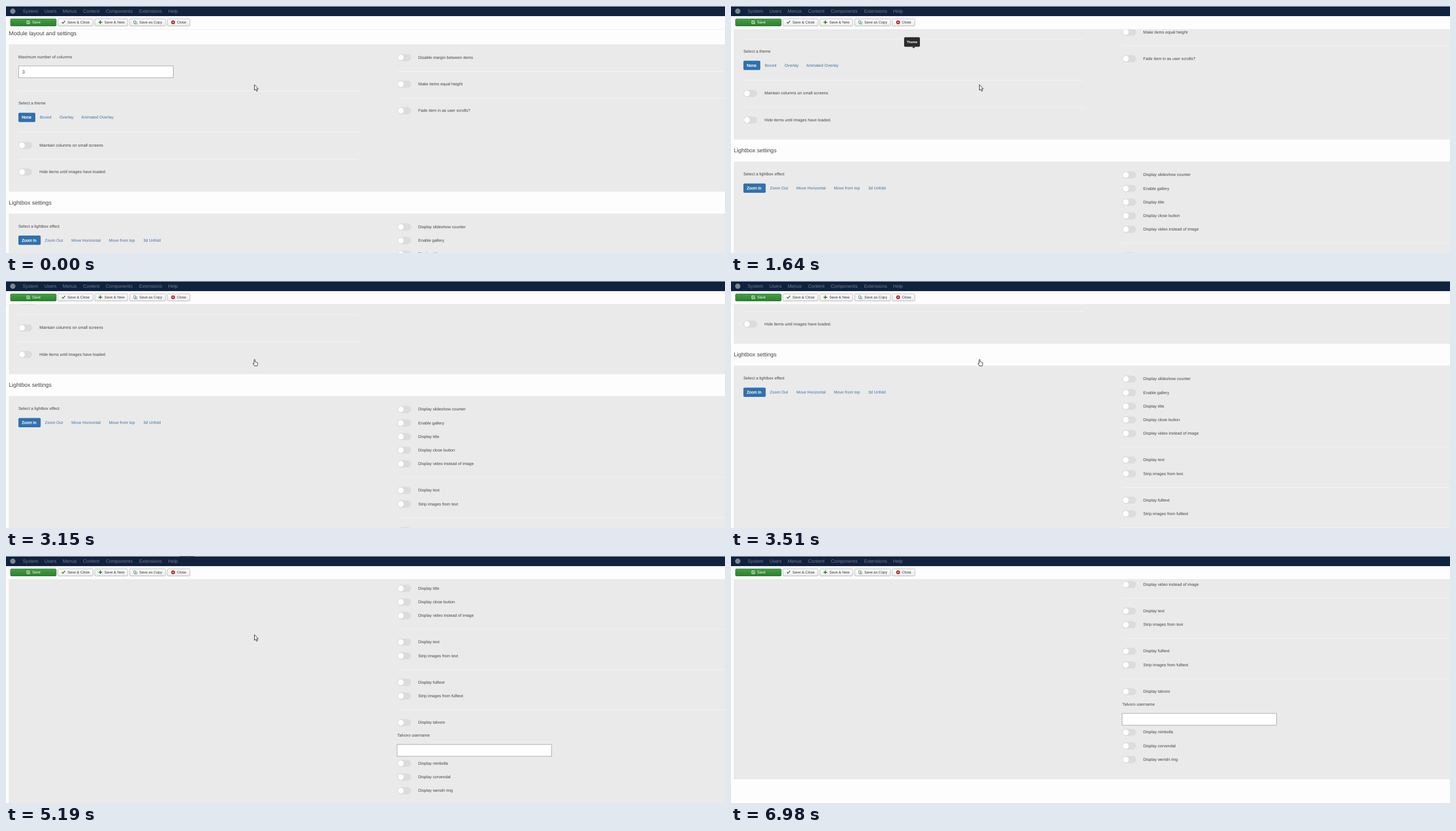
Animation of 1275 by 439 pixels, one loop 7.94 s. Source, as an HTML page:

```html
<!DOCTYPE html>
<html lang="en">
<head>
<meta charset="utf-8">
<title>Module settings</title>
<style>
html, body { margin: 0; width: 100%; height: 100%; overflow: hidden; background: #fdfdfd; }
svg { display: block; width: 1275px; height: 439px; }
text { font-family: "Liberation Sans", Arial, sans-serif; text-rendering: geometricPrecision; white-space: pre; }
</style>
</head>
<body>
<svg id="stage" viewBox="0 0 1275 439">
  <defs>
    <linearGradient id="green" x2="0" y2="1"><stop stop-color="#43a047"/><stop offset="1" stop-color="#2c812c"/></linearGradient>
    <linearGradient id="pale" x2="0" y2="1"><stop stop-color="#fff"/><stop offset="1" stop-color="#ebebeb"/></linearGradient>
  </defs>
  <g id="page"></g>
  <g id="bar"></g>
  <g id="tip"></g>
  <path id="arrow" d="M440.5 139.8v10l2.2-2 1.7 3.8 1.7-.8-1.7-3.6h3z" fill="#fff" stroke="#222" stroke-width=".9"/>
  <path id="hand" d="M439.8 147v-6.3q0-1.2 1-1.2t1 1.2v3.2q1.3-.5 1.6.4 1.2-.4 1.5.5 1.3-.2 1.3 1v2.5q0 1.5-.9 2.7h-4.6l-2.7-4q.4-1.2 1.8 0z" fill="#fff" stroke="#222" stroke-width=".9"/>
</svg>
<script>
const $ = id => document.getElementById(id);
const rect = (x, y, w, h, fill, more = '') =>
  `<rect x="${x}" y="${y}" width="${w}" height="${h}" fill="${fill}" ${more}/>`;
// Text is placed by its left edge and vertical middle.
const text = (x, y, s, size = 7.25, fill = '#434343', more = '') =>
  `<text x="${x}" y="${y + size * .345}" font-size="${size}" fill="${fill}" ${more}>${s}</text>`;
const toggle = (x, y, label) => rect(x, y - 6.3, 24.5, 12.8, '#dcdcdc', 'rx="6.4"') +
  `<circle cx="${x + 6.3}" cy="${y + .1}" r="5" fill="#fff"/>` + text(x + 37.3, y - .3, label);
const line = (x, y, w) => rect(x, y - .5, w, 1, '#f4f4f4');
const field = (x, y) => rect(x + .5, y + .5, 274, 21, '#fff', 'stroke="#aaa"');
const tabs = (y, width, items) => rect(22, y - 8.2, width, 16.4, '#3071ad', 'rx="2"') +
  items.map(([x, s], i) => i ? text(x, y, s, 7.2, '#41719f')
    : text(x, y, s, 7.1, '#fff', 'stroke="#fff" stroke-width=".25"')).join('');

const L = 22, R = 693.8;
const options = [
  [392.7, 'Display slideshow counter'], [416.8, 'Enable gallery'], [441, 'Display title'],
  [465.2, 'Display close button'], [489.4, 'Display video instead of image'],
  [536.6, 'Display text'], [560.8, 'Strip images from text'],
  [608, 'Display fulltext'], [632.2, 'Strip images from fulltext'],
  [679.6, 'Display talvoro'], [752, 'Display nimbolla'],
  [776.3, 'Display corvendal'], [800.5, 'Display wendri ring']
];

$('page').innerHTML =
  text(5, 48.3, 'Module layout and settings', 10.1) +
  rect(5, 68, 1270, 262, '#eaeaea') +
  text(L, 90, 'Maximum number of columns') + field(L, 106) + text(28.5, 117.5, '3', 8.5) +
  line(L, 151.5, 603) + text(L, 172.5, 'Select a theme') +
  tabs(198, 30, [[28, 'None'], [60, 'Boxed'], [95, 'Overlay'], [133.5, 'Animated Overlay']]) +
  line(L, 224.3, 603) + toggle(L, 247.7, 'Maintain columns on small screens') +
  line(L, 272.3, 603) + toggle(L, 295, 'Hide items until images have loaded.') +
  toggle(R, 91.5, 'Disable margin between items') + line(R, 116.3, 582) +
  toggle(R, 138.8, 'Make items equal height') + line(R, 163.5, 582) +
  toggle(R, 186, 'Fade item in as user scrolls?') +
  text(5, 349.5, 'Lightbox settings', 10.1) +
  rect(5, 369, 1270, 466.5, '#eaeaea') +
  text(L, 391, 'Select a lightbox effect') +
  tabs(416.3, 39.5, [[28, 'Zoom In'], [69, 'Zoom Out'], [116, 'Move Horizontal'], [182.5, 'Move from top'], [243.5, '3d Unfold']]) +
  options.map(([y, s]) => toggle(R, y, s)).join('') +
  [513.5, 585.3, 657].map(y => line(R, y, 582)).join('') +
  text(R, 702.3, 'Talvoro username') + field(R - .8, 718);

const button = (x, w, fill, stroke) => rect(x + .5, 23, w - 1, 12.5, fill, `rx="1.5" stroke="${stroke}" stroke-width=".9"`);
const pen = (d, colour, width = 1) => `<path d="${d}" fill="none" stroke="${colour}" stroke-width="${width}"/>`;
const menu = [[29.5, 'System'], [68, 'Users'], [100.5, 'Menus'], [136.5, 'Content'],
  [177, 'Components'], [236, 'Extensions'], [287.5, 'Help']];

$('bar').innerHTML =
  rect(0, 0, 1275, 41.5, '#fdfdfd') + rect(0, 41, 1275, .6, '#e6e6e6') +
  rect(0, 0, 1275, 18, '#10223e') + rect(0, 0, 1275, 1, '#c9ccd1') +
  '<circle cx="12" cy="9.3" r="4.7" fill="#7e8690"/>' +
  menu.map(([x, s]) => text(x, 9.5, s, 8.35, '#737d89')).join('') +
  button(7.5, 82, 'url(#green)', '#2b762b') + text(46.5, 29.2, 'Save', 6.5, '#fff') +
  [[91.5, 63.5, 109, 'Save &amp; Close'], [157, 59.5, 174.5, 'Save &amp; New'],
   [219, 64.5, 236.5, 'Save as Copy'], [285.5, 41, 303, 'Close']]
    .map(([x, w, tx, s]) => button(x, w, 'url(#pale)', '#b5b5b5') + text(tx, 29.2, s, 6.5, '#333')).join('') +
  pen('M41 26.5h-4v5h5v-2.5M38.5 28.5l1.3 1.5 2.5-3.5', '#fff', .9) +
  pen('M99 28.7l2 2 3.8-4.4', '#378137', 1.6) +
  pen('M164 28.8h6.6M167.3 25.5v6.6', '#378137', 1.7) +
  pen('M226.5 26h3v4.5h-3zM229.5 28h2.5v4h-3.5v-1.5', '#4d8a62', .8) +
  '<circle cx="296.3" cy="28.9" r="3.4" fill="#b3262a"/>' + pen('M295 27.6l2.6 2.6m0-2.6l-2.6 2.6', '#fff', .9);

const tips = {
  theme: [167.5, 28, 'Theme', 5.9],
  columns: [241.5, 220, 'When enabled the columns in this module will not collapse to a single column.', 5.65],
  effect: [386.5, 28, 'Theme', 5.9]
};

// Start time, scroll offset, pointer, tooltip
const steps = [
  [0, 0, 'arrow'], [140, 33, 'arrow'], [480, 54.7, 'arrow', 'theme'],
  [1640, 92.5, 'arrow', 'theme'], [2000, 110, 'hand', 'columns'], [2410, 141.5, 'hand', 'columns'],
  [2750, 162, 'hand'], [3150, 164.5, 'hand'], [3510, 218.5, 'hand'], [4230, 229, 'hand'],
  [4550, 273.5, 'arrow', 'effect'], [4860, 312, 'arrow', 'effect'], [5190, 383.5, 'arrow', 'effect'],
  [5490, 384.5, 'arrow'], [5940, 395.3, 'arrow'], [6270, 438.7, 'arrow'], [6420, 438.7, '']
];

function drawTip(name, scroll) {
  if (!name) return '';
  const [base, w, label, size] = tips[name], y = base - scroll;
  const fill = name === 'effect' ? '#414141' : '#2b2b2b';
  return rect(321 - w / 2, y - 19.5, w, 17, fill, 'rx="2"') +
    `<path d="M321 ${y - 2.6}h6l-3 2.9z" fill="${fill}"/>` +
    text(321, y - 11, label, size, '#fff', 'font-weight="700" text-anchor="middle"');
}

let shown;
function draw(now) {
  const t = now % 7940, step = steps.findLast(s => s[0] <= t);
  if (step !== shown) {
    shown = step;
    const [, scroll, pointer, tip] = step;
    $('page').setAttribute('transform', `translate(0 ${-scroll})`);
    $('tip').innerHTML = drawTip(tip, scroll);
    for (const id of ['arrow', 'hand']) $(id).style.display = id === pointer ? '' : 'none';
  }
  requestAnimationFrame(() => draw(performance.now() - start));
}
const start = performance.now();
draw(0);
</script>
</body>
</html>
```
